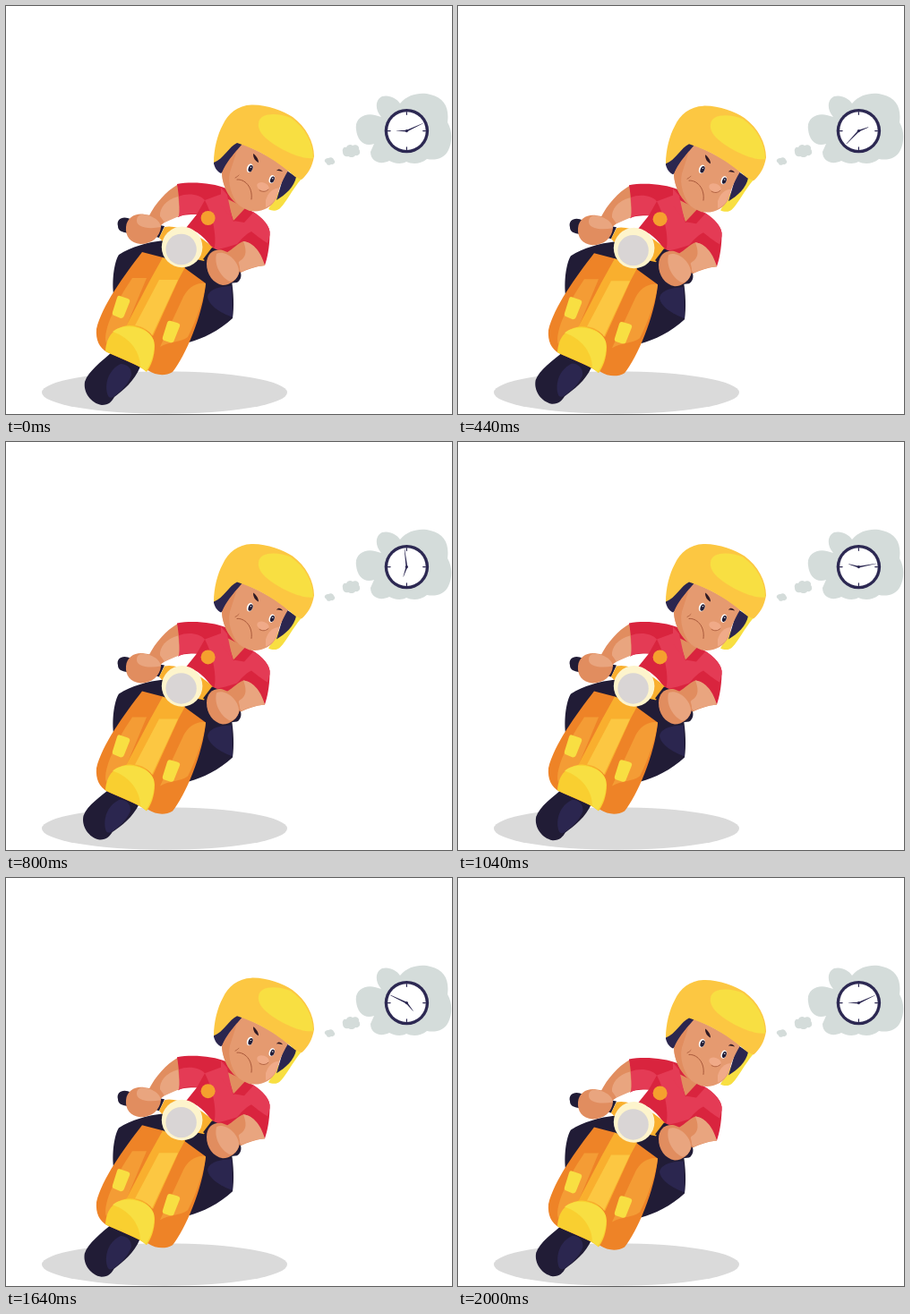
An HTML page with a canvas that plays this animation: 498 by 456 pixels, repeating every 2040 ms.

```html
<!DOCTYPE html>
<html lang="en">
<head>
<meta charset="utf-8">
<title>Late delivery</title>
<style>
html, body { margin: 0; width: 100%; height: 100%; overflow: hidden; background: #fff; }
canvas { display: block; }
</style>
</head>
<body>
<canvas id="stage" width="498" height="456"></canvas>
<script>
const ctx = document.getElementById('stage').getContext('2d');
const TAU = Math.PI * 2;
const STEP = 40, STEPS = 51;

const C = {
  shadow: '#dadada', cloud: '#d4dcda', ink: '#2c2852',
  navy: '#211c36', navyLit: '#2b264f',
  orange: '#ee8327', orangeLit: '#f49c35', amber: '#f9af2e', gold: '#fcc742',
  yellow: '#f9cf30', lemon: '#f8df42',
  skin: '#e18d5f', skinMid: '#e59a70', skinLit: '#e9a57f', blush: '#f0aa88', line: '#a8583a',
  red: '#d9243e', redLit: '#e43b55',
  cream: '#fdf4cc', grey: '#d9d5d5'
};

const paths = {};
const toPath = d => paths[d] || (paths[d] = new Path2D(d));

function fill(color, d) {
  ctx.fillStyle = color;
  ctx.fill(toPath(d));
}

function stroke(color, width, d) {
  ctx.strokeStyle = color;
  ctx.lineWidth = width;
  ctx.lineCap = 'round';
  ctx.stroke(toPath(d));
}

function oval(color, x, y, rx, ry = rx, turn = 0) {
  ctx.fillStyle = color;
  ctx.beginPath();
  ctx.ellipse(x, y, rx, ry, turn, 0, TAU);
  ctx.fill();
}

function placed(x, y, turn, draw) {
  ctx.save();
  ctx.translate(x, y);
  ctx.rotate(turn);
  draw();
  ctx.restore();
}

function drawThought() {
  fill(C.cloud, 'M391 138C389 126 400 119 412 122L419 124C411 115 413 104 420 101C428 99 436 103 440 109C449 98 464 96 474 99C490 103 495 114 493 130C499 140 498 153 494 161C490 170 480 173 470 171C463 177 453 177 447 174C440 178 432 175 428 173C418 178 407 174 407 163L411 154C400 158 392 150 391 138Z');
  fill(C.cloud, 'M376 163C375 159 378 157 380 158C381 155 385 154 387 156C390 154 395 156 394 160C397 164 394 168 390 167C388 170 384 169 382 168C378 169 376 166 376 163Z');
  fill(C.cloud, 'M356 174C355 171 358 170 360 170C363 168 366 170 366 172C369 174 366 178 363 177C360 179 358 177 358 176Z');
}

function drawHand(angle, length) {
  placed(0, 0, angle, () => fill(C.ink, `M-.9 0L-.2 ${-length}H.2L.9 0Z`));
}

function drawClock(turn) {
  placed(447.4, 139.6, 0, () => {
    oval(C.ink, 0, 0, 24.7);
    oval('#fff', 0, 0, 21.3);
    for (let i = 0; i < 4; i++) {
      placed(0, 0, i * TAU / 4, () => stroke(C.ink, 1.2, 'M0 -18.3V-21'));
    }
    drawHand(turn + 65 * TAU / 360, 20);
    drawHand(turn + 271 * TAU / 360, 11.5);
    oval(C.ink, 0, 0, 1.6);
  });
}

function drawWheel(turn) {
  const px = 140, py = 385;
  placed(px, py, turn, () => {
    ctx.translate(-px, -py);
    fill(C.navy, 'M119 386C106 398 92 408 88 420C86 432 95 444 107 446C115 446 118 442 121 437C131 429 143 420 150 403L142 380Z');
    fill(C.navyLit, 'M128 400C116 406 110 419 113 433C114 438 117 439 121 436C129 430 136 423 140 413C141 405 135 400 128 400Z');
  });
}

function drawLegs() {
  fill(C.navy, 'M120 322C118 302 122 284 126 278C140 269 158 264 176 262L205 270L228 272L252 307C254 320 255 336 253 349C238 363 219 372 204 376L170 350L150 290Z');
  fill(C.navyLit, 'M252 313C238 313 226 317 225 325C227 337 243 344 253 348Z');
}

function drawScooter() {
  fill(C.orange, 'M152 275C132 301 107 335 101 361C100 373 104 382 113 387L158 407C168 413 177 414 186 409C200 392 220 345 223 310L197 291L175 281Z');
  fill(C.orangeLit, 'M141 304H157L134 359C126 362 118 368 112 377C109 370 114 354 118 346C123 331 132 318 141 304Z');
  fill(C.orangeLit, 'M223 310C213 308 203 315 198 325L172 381C182 375 195 376 203 370C213 350 221 328 223 310Z');
  fill(C.amber, 'M175 281L200 292L193 305L164 369C159 362 148 357 134 358L160 308Z');
  fill(C.gold, 'M171 306L192 306L163 368C159 362 152 358 144 357Z');
  fill(C.yellow, 'M111 386C112 368 122 358 138 357C154 358 166 367 166 380C166 392 162 402 157 409C147 400 128 394 111 386Z');
  fill(C.lemon, 'M119 364C131 354 158 357 165 374C167 388 161 401 156 408L150 403C150 388 140 371 119 364Z');
  fill(C.lemon, 'M127 324L136 327Q139 328 138 331L132 346Q131 349 128 349L121 346Q118 345 119 342L124 326Q125 323 127 324Z');
  fill(C.lemon, 'M184 352L191 354Q195 355 194 358L188 373Q187 377 183 376L177 374Q174 373 175 370L180 354Q181 351 184 352Z');
}

function drawShirt() {
  fill(C.red, 'M191 199C208 196 232 198 246 204L274 229C286 236 296 246 294.5 256C294 271 292 281 289 290L266 284L231 273C225 260 212 250 201 248L213 233C204 233 198 233 192 236Z');
  fill(C.redLit, 'M192 213C204 208 217 211 222 217L213 233C205 231 198 233 192 236Z');
  fill(C.redLit, 'M222 217L241 210L254 241L270 230L276 230C287 237 296 247 294.5 256L292 265C284 260 279 256 274 252C266 256 262 262 258 266C250 269 240 271 232 273C236 262 232 236 222 217Z');
  fill(C.skin, 'M246 215L270 227L254 240Z');
  fill(C.redLit, 'M240 203L247 211L253 239L240 222Z');
  fill(C.red, 'M254 240L267 226L276 231L266 242Z');
  oval('#f5a02e', 225.6, 237, 8);
}

function drawArms() {
  fill(C.navy, 'M125 246C123 239 129 235 136 237L146 241L142 255L132 253C128 252 125 250 125 246Z');
  fill(C.navy, 'M166 244L177 246L171 259L164 257Z');
  fill(C.amber, 'M171 259L177 247C190 244 215 254 231 270L221 285L190 278Z');
  fill(C.navy, 'M230 270L237 273L229 288L220 283Z');

  fill(C.skin, 'M191 200C179 207 167 220 159 236L172 246C180 239 186 237 193 235C194 222 193 210 191 200Z');
  fill(C.skinLit, 'M192 213C179 216 171 226 172 235L177 242L193 235C194 227 193 220 192 213Z');
  fill(C.skin, 'M134 247C135 236 145 231 155 233C165 234 173 238 173 247C172 258 163 266 150 266C139 265 133 257 134 247Z');
  fill(C.skinLit, 'M146 239C145 247 158 250 173 247C172 238 160 233 151 233C148 234 146 236 146 239Z');

  fill(C.navy, 'M250 296L260 294C264 299 263 306 258 309L249 310Z');
  fill(C.skin, 'M246 276C254 271 259 265 265 263C274 264 282 271 289 290C279 291 270 294 262 298Z');
  fill(C.skinLit, 'M265 263C274 264 284 272 289 290C279 291 272 293 263 297C259 292 258 287 261 285C270 280 268 271 265 263Z');
  fill(C.skin, 'M224 288C224 277 232 271 242 273C254 277 262 285 261 296C259 306 250 312 242 312C231 310 224 300 224 288Z');
  fill(C.skinLit, 'M235 277C244 272 260 284 260 297C259 304 254 308 250 308C240 303 232 290 235 277Z');
}

function drawLamp() {
  oval(C.cream, 196.6, 269.4, 22.8);
  oval(C.grey, 195.6, 272, 17.2);
}

function drawHead() {
  fill(C.navyLit, 'M232 174L256 151L270 157L252 178L240 187C236 185 233 181 232 176Z');
  fill(C.lemon, 'M318 188L330 193C319 206 313 219 307 225C303 230 297 229 293 227L303 210Z');
  fill(C.navyLit, 'M312 183L324 191C322 202 312 211 302 217Z');
  fill(C.skinMid, 'M264 154C255 164 245 178 241 187C242 206 254 222 272 229C285 231 296 226 302 215C304 205 308 196 315 184C300 170 280 161 264 154Z');
  fill(C.skin, 'M258 161C250 170 243 180 241 187C242 204 251 217 260 223C252 213 247 198 250 186Z');
  fill(C.blush, 'M290 217C293 208 299 203 305 204C303 214 298 222 290 225Z');

  fill(C.gold, 'M232 175C232 160 236 144 242 133C248 120 259 111 274 110.5C291 110 309 117 320 124C335 135 344 152 344 168C342 180 337 188 330 194L323 191C304 174 281 160 258 153C249 157 243 171 232 175Z');
  fill(C.lemon, 'M282 131C283 119 303 119 318 125C334 136 343 153 343 170C330 172 305 160 293 150C285 144 281 137 282 131Z');

  oval('#fff', 272.3, 181.2, 3.2, 5, .35);
  oval('#fff', 296.8, 193.6, 3, 4.7, .35);
  oval(C.navy, 273, 181.6, 2.3, 3.9, .35);
  oval(C.navy, 297.4, 194, 2.2, 3.7, .35);
  oval('#fff', 273.4, 180.2, .7);
  oval('#fff', 297.8, 192.8, .7);
  fill('#301a24', 'M276 165C279 167 282 171 282 175C278 173 276 170 276 165Z');
  fill('#301a24', 'M302 184C304 181.5 307 182 309 185C306 184 304 184.5 302 184Z');

  oval(C.blush, 287, 202, 7, 4.6, .35);
  stroke(C.line, .8, 'M283 206C286 208 290 208 293 205');
  stroke(C.line, 1, 'M258 194C266 193 276 202 274 216');
  stroke(C.line, .8, 'M256 192C258 191 259 190 260 189');
}

function render(ms) {
  const t = (Math.floor(ms / STEP) % STEPS) * STEP;
  const swing = period => (1 - Math.cos(TAU * t / period)) / 2;

  ctx.fillStyle = '#fff';
  ctx.fillRect(0, 0, 498, 456);
  oval(C.shadow, 177, 432, 137, 23.8);
  drawThought();
  drawClock(TAU * t / 1000);

  const bob = 4.6 * swing(240);
  placed(0, bob, 0, drawLegs);
  drawWheel(.045 * swing(320));
  placed(0, bob, 0, () => {
    drawScooter();
    drawShirt();
    drawArms();
    drawLamp();
    drawHead();
  });
}

const start = performance.now();
function loop() {
  render(performance.now() - start);
  requestAnimationFrame(loop);
}
loop();
</script>
</body>
</html>
```
